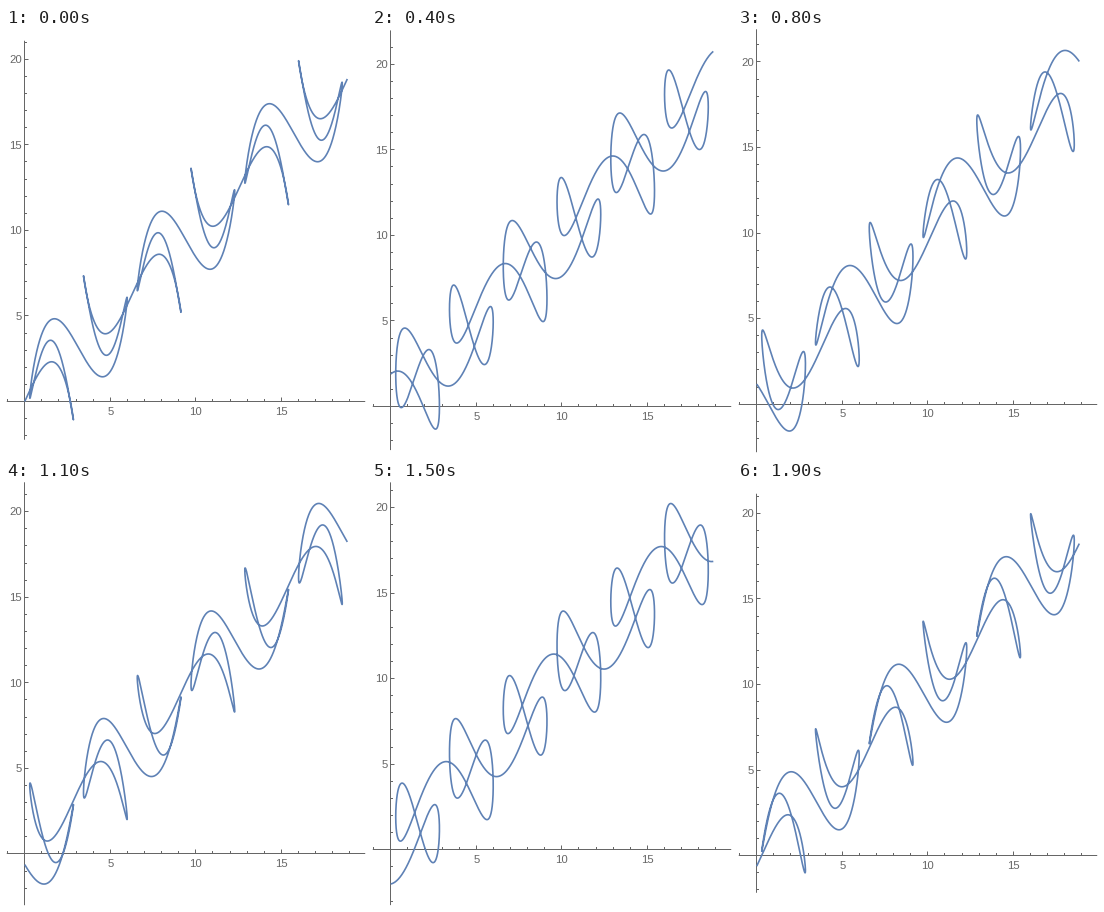
Recreate the animation shown at these times as a matplotlib script. Size 360 by 425 pixels, loop 2 s.

```python
import numpy as np
import matplotlib.pyplot as plt
from matplotlib.animation import FuncAnimation
from matplotlib.collections import LineCollection

W, H, DPI = 360, 425, 100
FRAMES, INTERVAL = 20, 100
SCALE = 17.114          # pixels per unit on both axes
PAD = 0.05 / 0.9        # margin around the data, as a share of its span
BLUE = (0.368417, 0.506779, 0.709798)
GRAY = "0.4"

t = np.linspace(0, 6 * np.pi, 6001)
x = t + 2 * np.sin(2 * t)
X0 = (W - t[-1] * SCALE) / 2    # column of x = 0


def px(size):
    return size * 72 / DPI


def snap(v):
    return np.floor(v) + 0.5


fig = plt.figure(figsize=(W / DPI, H / DPI), dpi=DPI, facecolor="white")
ax = fig.add_axes([0, 0, 1, 1])
ax.set_xlim(0, W)
ax.set_ylim(H, 0)
ax.axis("off")

# Coordinates are already on pixel centres, so no further snapping.
axes_lines = LineCollection([], colors=GRAY, linewidths=px(1), zorder=1,
                            snap=False)
ax.add_collection(axes_lines)
curve, = ax.plot([], [], color=BLUE, lw=px(1.65), zorder=2,
                 solid_joinstyle="round", solid_capstyle="butt")


def label(value, col, align):
    return ax.text(col, 0, str(value), ha=align, va="baseline", color=GRAY,
                   family="Liberation Sans", fontsize=px(11.4))


x_labels = [label(v, X0 + v * SCALE, "center") for v in (5, 10, 15)]
y_labels = [(v, label(v, 16, "right")) for v in (5, 10, 15, 20)]


def tick_size(value):
    return 4 if value % 5 == 0 else 2.5


def middle(span):
    """Row of the plot's centre: whole-pixel plot height, centred on the stage."""
    height = np.ceil(span * SCALE) + 2
    return (H - height) // 2 + height / 2 + 0.25


def draw(n):
    y = t + 2 * np.sin(5 * t + 2 * np.pi * n / FRAMES)
    low, high = y.min(), y.max()
    margin = PAD * (high - low)
    low, high = low - margin, high + margin
    zero = middle(high - low) + SCALE * (low + high) / 2
    side = PAD * t[-1]
    row, axis_col = snap(zero), snap(X0)

    lines = [[(X0 - side * SCALE, row), (X0 + (t[-1] + side) * SCALE, row)],
             [(axis_col, zero - low * SCALE), (axis_col, zero - high * SCALE)]]
    for v in range(int(np.ceil(-side)), int(t[-1] + side) + 1):
        col = snap(X0 + v * SCALE)
        lines.append([(col, row), (col, row - tick_size(v))])
    for v in range(int(np.ceil(low)), int(high) + 1):
        level = snap(zero - v * SCALE)
        lines.append([(axis_col, level), (axis_col + tick_size(v), level)])
    axes_lines.set_segments(lines)

    curve.set_data(X0 + x * SCALE, zero - y * SCALE)
    for text in x_labels:
        text.set_y(zero + 13)
    for v, text in y_labels:
        text.set_y(zero - v * SCALE + 3.7)
    return [axes_lines, curve]


anim = FuncAnimation(fig, draw, frames=FRAMES, interval=INTERVAL,
                     init_func=lambda: draw(0), repeat=True, repeat_delay=0)
plt.show()
```
